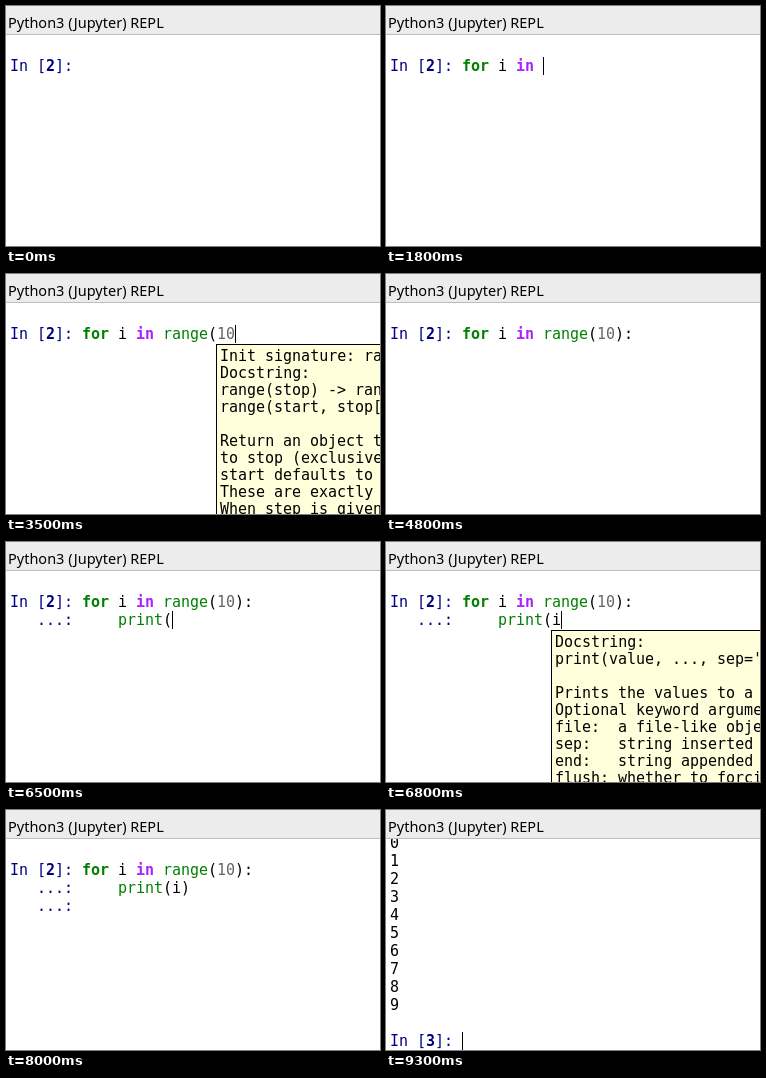
An HTML page that plays this animation: 374x240 px, repeating every 9800 ms.

```html
<!DOCTYPE html>
<html lang="en">
<head>
<meta charset="utf-8">
<title>Python3 (Jupyter) REPL</title>
<style>
  html, body { margin: 0; width: 100%; height: 100%; overflow: hidden; background: #fff; }
  #stage { position: relative; width: 374px; height: 240px; overflow: hidden; background: #fff; }
  #title {
    position: absolute; inset: 0 0 auto; height: 28px; box-sizing: border-box;
    padding: 6px 0 0 2px; background: #ececec; border-bottom: 1px solid #bdbdbd; box-sizing: content-box;
    height: 22px; font: 14.5px/20px "Noto Sans", sans-serif; color: #000; white-space: nowrap;
  }
  #console { position: absolute; inset: 29px 0 0; overflow: hidden; }
  #console, #tip { font: 15px/18px "DejaVu Sans Mono", monospace; color: #000; white-space: pre; }
  #console span, #tip span { position: absolute; }
  #cursor { position: absolute; width: 1px; height: 18px; background: #000; }
  #tip {
    position: absolute; width: 800px; height: 300px; line-height: 17px;
    background: #ffffdc; border: 1px solid #000; box-sizing: border-box;
  }
  .prompt { color: #000080; }
  .count { color: #000080; font-weight: bold; }
  .keyword { color: #008000; font-weight: bold; }
  .operator { color: #aa22ff; font-weight: bold; }
  .builtin { color: #008000; }
  .number { color: #666; }
  .match { background: #c0c0c0; width: 9px; height: 18px; }
</style>
</head>
<body>
<div id="stage">
  <div id="title">Python3 (Jupyter) REPL</div>
  <div id="console"><div id="lines"></div></div>
  <div id="cursor"></div>
  <div id="tip" hidden></div>
</div>
<script>
const LOOP = 9800, RUN = 8200, BLINK = 550;
const CELL = 9, ROW = 18, LEFT = 4, TOP = 51, HEADER = 29, PROMPT_COLS = 8;

const KEYS = "for i in range(10):\nprint(i)\n";
const KEY_TIMES = [
  600, 700, 800, 900, 1000, 1300, 1400, 1500, 1700,
  1900, 2000, 2200, 2300, 2400, 2600, 3200, 3400, 3800, 4200, 5000,
  5500, 5600, 5800, 5900, 6100, 6400, 6800, 7000, 7400
];

const TIPS = [
  { from: 2800, to: 3800, x: 210, y: 70, text:
`Init signature: range(self, /, *args, **kwargs)
Docstring:
range(stop) -> range object
range(start, stop[, step]) -> range object

Return an object that produces a sequence of integers
to stop (exclusive) by step.
start defaults to 0, and stop is omitted!
These are exactly the valid indices for a list.
When step is given, it specifies the increment.` },
  { from: 6600, to: 7000, x: 165, y: 88, text:
`Docstring:
print(value, ..., sep=' ', end='\\n', file=sys.stdout)

Prints the values to a stream, or to sys.stdout
Optional keyword arguments:
file:  a file-like object (stream)
sep:   string inserted between values
end:   string appended after the last value
flush: whether to forcibly flush the stream.` }
];

const STYLES = { for: "keyword", in: "operator", range: "builtin", print: "builtin" };
const $ = id => document.getElementById(id);
const escapeHtml = s => s.replace(/&/g, "&amp;").replace(/</g, "&lt;").replace(/>/g, "&gt;");
const styleOf = word => STYLES[word] || (/^\d/.test(word) ? "number" : "");

function token(text, x, y, style = "") {
  return `<span class="${style}" style="left:${x}px;top:${y}px">${escapeHtml(text)}</span>`;
}

// Every word sits on the fixed character grid.
function tokens(text, x, y, style) {
  return [...text.matchAll(/\w+|[^\w\s]/g)]
    .map(m => token(m[0], x + m.index * CELL, y, style(m[0]))).join("");
}

function prompt(number, y) {
  return token("In [", LEFT, y, "prompt") + token(number, LEFT + 4 * CELL, y, "count") +
    token("]:", LEFT + 5 * CELL, y, "prompt");
}

function codeView(typed) {
  const lines = typed.replace(/\n/g, "\n    ").split("\n");
  const last = lines.length - 1;
  const codeX = LEFT + PROMPT_COLS * CELL;
  const html = lines.map((line, i) => {
    const y = TOP - HEADER + i * ROW;
    let out = i ? token("...:", LEFT + 3 * CELL, y, "prompt") : prompt("2", y);
    if (i === last && line.endsWith(")")) {
      for (const col of [line.lastIndexOf("("), line.length - 1])
        out += token("", codeX + col * CELL, y, "match");
    }
    return out + tokens(line, codeX, y, styleOf);
  }).join("");
  return { html, x: codeX + lines[last].length * CELL, y: TOP + last * ROW };
}

function resultView() {
  const bottom = 222;
  let html = prompt("3", bottom - HEADER);
  for (let i = 0; i < 10; i++) html += token(String(i), LEFT, bottom - HEADER - (11 - i) * ROW);
  return { html, x: LEFT + PROMPT_COLS * CELL, y: bottom };
}

let shown = "";
function render(t) {
  const count = KEY_TIMES.filter(time => time <= t).length;
  const done = t >= RUN;
  const tip = TIPS.find(item => t >= item.from && t < item.to);
  const blinkStart = done ? RUN : count ? KEY_TIMES[count - 1] : 100;
  const cursorOn = Math.floor((t - blinkStart) / BLINK) % 2 === 0;
  $("cursor").hidden = !cursorOn;

  const state = `${done}/${count}/${TIPS.indexOf(tip)}`;
  if (state === shown) return;
  shown = state;
  const view = done ? resultView() : codeView(KEYS.slice(0, count));
  $("lines").innerHTML = view.html;
  $("cursor").style.left = view.x + "px";
  $("cursor").style.top = view.y + "px";
  $("tip").hidden = !tip;
  if (tip) {
    $("tip").style.left = tip.x + "px";
    $("tip").style.top = tip.y + "px";
    $("tip").innerHTML = tip.text.split("\n")
      .map((line, i) => tokens(line, 3, 3 + i * 17, () => "")).join("");
  }
}

const start = performance.now();
function tick() {
  render((performance.now() - start) % LOOP);
  requestAnimationFrame(tick);
}
tick();
</script>
</body>
</html>
```
